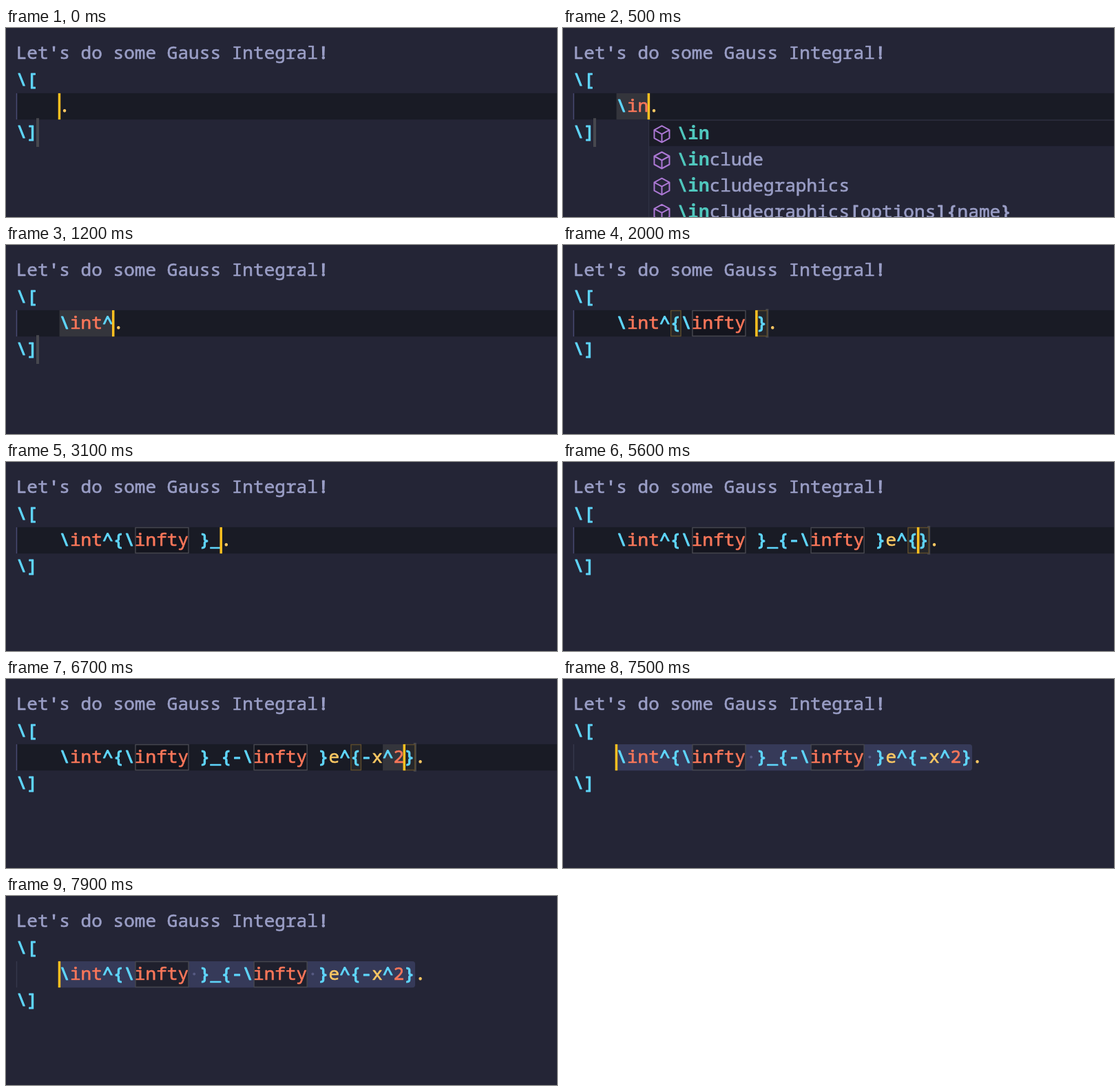
These frames come from a looping animation (800 by 275 pixels, 8000 ms). An HTML page with a canvas:

```html
<!DOCTYPE html>
<html lang="en">
<head>
<meta charset="utf-8">
<title>Typing an integral</title>
<style>
  html, body { margin: 0; width: 100%; height: 100%; overflow: hidden; background: #242536; }
  canvas { display: block; width: 800px; height: 275px; }
</style>
</head>
<body>
<canvas id="stage"></canvas>
<script>
const W = 800, H = 275, LOOP = 8000;
const LEFT = 15, ADV = 15.65, TOP = 18.3, LINE = 38.3, INDENT = 4;
const FONT = '26px "Fira Mono", "Noto Sans Mono", "DejaVu Sans Mono", monospace';
const C = {
  bg: '#242536', active: '#191b25', text: '#9a9ec6', cyan: '#5fd5fb', red: '#fb775a',
  yellow: '#fbc863', cursor: '#ffc020', mark: '#47484e', slot: '#34353c',
  select: '#363a59', teal: '#50c8be', purple: '#ac78d4'
};

const canvas = document.getElementById('stage');
const ctx = canvas.getContext('2d');
const dpr = window.devicePixelRatio || 1;
canvas.width = W * dpr;
canvas.height = H * dpr;
ctx.scale(dpr, dpr);
ctx.lineJoin = 'round';

const FIRST = '\\int^{\\infty }';
const BOTH = FIRST + '_{-\\infty }';

// Each step: start time, formula text, cursor index
const STEPS = [
  [0, '', 0], [100, '\\', 1], [300, '\\i', 2], [400, '\\in', 3], [700, '\\int', 4],
  [1100, '\\int^', 5], [1500, '\\int^{}', 6], [1900, FIRST, 13], [2600, FIRST, 14],
  [2900, FIRST + '_', 15], [3300, FIRST + '_{}', 16], [3500, FIRST + '_{-}', 17],
  [3800, BOTH, 24], [4300, BOTH, 25], [4800, BOTH + 'e', 26], [5200, BOTH + 'e^', 27],
  [5500, BOTH + 'e^{}', 28], [5700, BOTH + 'e^{-}', 29], [6000, BOTH + 'e^{-x}', 30],
  [6500, BOTH + 'e^{-x^2}', 32], [7000, BOTH + 'e^{-x^2}', 33], [7500, BOTH + 'e^{-x^2}', 0]
];
const SLOT_END = 1500, SELECT_AT = 7500;

const colX = c => LEFT + c * ADV;
const rowY = r => TOP + r * LINE;
const baseline = r => rowY(r) + 27;

function rect(x, y, w, h, color) {
  ctx.fillStyle = color;
  ctx.fillRect(x, y, w, h);
}

function box(c, len, fill, stroke) {
  const x = colX(c) + 0.8, y = rowY(2) + 0.7, w = len * ADV - 1.2, h = LINE - 1.4;
  rect(x, y, w, h, fill);
  ctx.strokeStyle = stroke;
  ctx.lineWidth = 1.5;
  ctx.strokeRect(x, y, w, h);
}

// A thin outline gives the medium weight; symbols are heavier than letters
function write(str, x, y, color, weight = 400) {
  ctx.font = weight + ' ' + FONT;
  ctx.fillStyle = ctx.strokeStyle = color;
  [...str].forEach((ch, i) => {
    const px = x - 0.3 + i * ADV;
    ctx.fillText(ch, px, y);
    if (weight > 400) return;
    ctx.lineWidth = /\w/.test(ch) ? 0.6 : 1.2;
    ctx.strokeText(ch, px, y);
  });
}

function formula(str) {
  for (const m of (str + '.').matchAll(/\\[a-z]*|./g)) {
    const tok = m[0], x = colX(INDENT + m.index), y = baseline(2);
    if (tok[0] === '\\') {
      write('\\', x, y, C.cyan);
      write(tok.slice(1), x + ADV, y, C.red);
    } else {
      write(tok, x, y, /\d/.test(tok) ? C.red : /[a-z.]/.test(tok) ? C.yellow : C.cyan);
    }
  }
}

function marker(c, r) {
  rect(colX(c) - 2.3, rowY(r) - 2, 4, LINE + 3.5, C.mark);
}

function cube(x, y) {
  ctx.beginPath();
  ctx.moveTo(x, y - 12);
  [[11, -6], [11, 6], [0, 12], [-11, 6], [-11, -6]].forEach(p => ctx.lineTo(x + p[0], y + p[1]));
  ctx.closePath();
  ctx.moveTo(x - 11, y - 6);
  ctx.lineTo(x, y);
  ctx.lineTo(x + 11, y - 6);
  ctx.moveTo(x, y);
  ctx.lineTo(x, y + 12);
  ctx.strokeStyle = C.purple;
  ctx.lineWidth = 2;
  ctx.stroke();
}

function popup(typed) {
  const x = 124, y = 133.5;
  const rows = typed === '\\in'
    ? ['\\in', '\\include', '\\includegraphics', '\\includegraphics[options]{name}']
    : ['\\int', '\\intop', '\\intertext', '\\intertext{text}'];
  rect(x, y, W - x, H - y, C.bg);
  rect(x, y, W - x, LINE, '#1a1b26');
  rect(x, y, W - x, 1.2, '#303244');
  rect(x, y, 1.2, H - y, '#303244');
  rows.forEach((label, i) => {
    const base = 161.6 + i * 38.2;
    cube(143.5, base - 7.3);
    write('\\', 166, base, C.teal);
    write(typed.slice(1), 166 + ADV, base, C.teal, 700);
    write(label.slice(typed.length), 166 + typed.length * ADV, base, C.text);
  });
}

function draw(t) {
  const [, str, cur] = STEPS.filter(s => s[0] <= t).pop();
  const selected = t >= SELECT_AT;
  const top = rowY(2);
  rect(0, 0, W, H, C.bg);

  if (!selected) rect(15, top, W - 15, LINE, C.active);
  rect(14.7, top, 1.5, LINE, selected ? '#35374b' : '#484b72');

  if (selected) {
    ctx.fillStyle = C.select;
    ctx.beginPath();
    ctx.roundRect(colX(INDENT), top, str.length * ADV, LINE, 4);
    ctx.fill();
  }

  // Snippet placeholders and their exit marks
  if (t < SLOT_END) {
    rect(colX(INDENT), top, str.length * ADV, LINE, C.slot);
    marker(2, 3);
  } else if (str[cur] === '}') {
    marker(INDENT + cur + 1, 2);
    if (str.slice(cur - 2, cur) === '^2') rect(colX(INDENT + cur - 2), top, 2 * ADV, LINE, C.slot);
  }

  for (const m of str.matchAll(/infty/g)) {
    box(INDENT + m.index, 5, selected ? '#1f202d' : '#14151e', '#45464e');
  }

  const close = str[cur] === '}' ? cur : str[cur - 1] === '}' ? cur - 1 : -1;
  if (close > 0) {
    [str.lastIndexOf('{', close), close].forEach(i => box(INDENT + i, 1, '#25262a', '#5c4b2c'));
  }

  write("Let's do some Gauss Integral!", colX(0), baseline(0), C.text);
  write('\\[', colX(0), baseline(1), C.cyan);
  write('\\]', colX(0), baseline(3), C.cyan);
  formula(str);

  if (selected) {
    for (const m of str.matchAll(/ /g)) {
      ctx.fillStyle = '#565a82';
      ctx.beginPath();
      ctx.arc(colX(INDENT + m.index + 0.5), top + 18.5, 2, 0, 7);
      ctx.fill();
    }
  }
  if (t >= 500 && t < 1000) popup(str);
  rect(colX(INDENT + cur) - 1.9, top, 3.5, LINE, C.cursor);
}

const start = performance.now();
function frame() {
  draw((performance.now() - start) % LOOP);
  requestAnimationFrame(frame);
}
frame();
</script>
</body>
</html>
```
